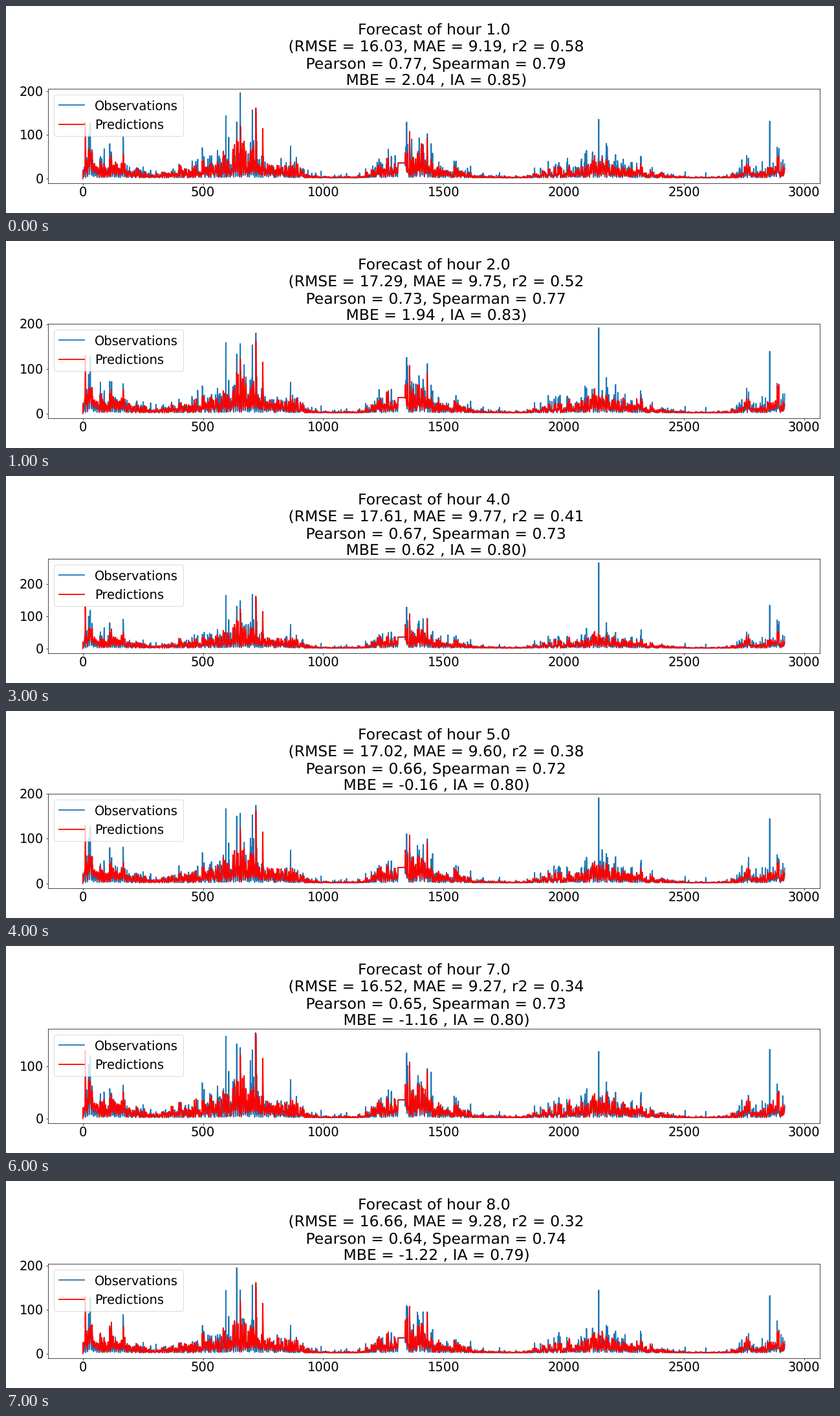
Write a matplotlib script that moves like this. It is 1280 px wide and 320 px high and loops after 8000 ms.

```python
import numpy as np
import matplotlib.pyplot as plt
from matplotlib.animation import FuncAnimation

plt.rcParams.update({"font.family": "DejaVu Sans", "font.size": 22,
                     "text.hinting": "none"})

W, H = 1280, 320
N = 2920
DAY = 8  # samples a day
HOURS = 8
GAP = slice(1311, 1341)  # constant stretch of missing data
GAP_LEVEL = 36

# RMSE, MAE, r2, Pearson, Spearman, MBE, IA
SCORES = [
    (16.03, 9.19, 0.58, 0.77, 0.79, 2.04, 0.85),
    (17.29, 9.75, 0.52, 0.73, 0.77, 1.94, 0.83),
    (18.19, 9.90, 0.45, 0.68, 0.75, 1.41, 0.80),
    (17.61, 9.77, 0.41, 0.67, 0.73, 0.62, 0.80),
    (17.02, 9.60, 0.38, 0.66, 0.72, -0.16, 0.80),
    (16.77, 9.43, 0.36, 0.65, 0.72, -0.66, 0.80),
    (16.52, 9.27, 0.34, 0.65, 0.73, -1.16, 0.80),
    (16.66, 9.28, 0.32, 0.64, 0.74, -1.22, 0.79),
]

# Polluted episodes: centre, width, height
EPISODES = [(35, 40, 85), (150, 35, 62), (250, 90, 12), (450, 60, 30),
            (660, 95, 98), (860, 50, 32), (1250, 45, 40), (1385, 60, 85),
            (1510, 90, 24), (1920, 40, 16), (2130, 100, 56), (2310, 60, 22),
            (2770, 35, 36), (2885, 28, 58)]

# Highest observation of each hour: sample, height
TOPS = [(655, 197), (2146, 192), (2146, 342), (2146, 266),
        (2146, 191), (718, 177), (718, 164), (640, 196)]

# Spikes that return every hour
OBS_SPIKES = {595: 155, 640: 138, 655: 150, 720: 165, 1347: 120,
              1433: 102, 2146: 140, 2857: 135}
PRED_SPIKES = {10: 130, 655: 122, 720: 162, 748: 115, 1359: 108, 1432: 92}

k = np.arange(N)
envelope = 5 + sum(h * np.exp(-((k - c) / w) ** 2 / 2) for c, w, h in EPISODES)


def per_day(values):
    return np.repeat(values, DAY)[:N]


# Weather shared by all hours: daily pulses, gusts and rare bursts
rng = np.random.default_rng(11)
DAYS = N // DAY + 1
strength = per_day(0.22 + 0.78 * rng.beta(1.1, 2.0, DAYS))
pulse = np.abs(np.cos(np.pi * (k + rng.normal(0, 0.7, N)) / DAY)) ** 1.3
pattern = strength * pulse * rng.uniform(0.7, 1.0, N)
low = per_day(rng.uniform(0.01, 0.14, DAYS))
gusts = rng.lognormal(0, 0.36, N)
bursts = (rng.random(N) < 0.025) * rng.exponential(4 + 0.3 * envelope)


def make_series(hour):
    noise = np.random.default_rng(100 + hour)
    peak_at, top = TOPS[hour - 1]
    gain = np.interp(hour, [1, HOURS], [1.1, 0.95])

    pred = 1 + envelope * (low + pattern * per_day(noise.normal(1, 0.12, DAYS)))
    pred = pred.clip(2, 130)
    for i, height in PRED_SPIKES.items():
        pred[i:i + 3] = height * np.array([1, 0.75, 0.5])

    obs = envelope * (0.02 + gain * pattern * gusts * noise.lognormal(0, 0.2, N))
    obs = (1 + np.minimum(obs, 1.4 * envelope) + bursts).clip(2, 0.8 * top)
    for i, height in OBS_SPIKES.items():
        obs[i] = min(height * noise.uniform(0.9, 1.1), 0.96 * top)
    obs[peak_at] = top

    obs[GAP] = pred[GAP] = GAP_LEVEL
    pred[0] = 0
    return obs, pred, top


def title_text(hour):
    rmse, mae, r2, pearson, spearman, mbe, ia = SCORES[hour - 1]
    return (f"Forecast of hour {hour:.1f}\n"
            f" (RMSE = {rmse:.2f}, MAE = {mae:.2f}, r2 = {r2:.2f}\n"
            f" Pearson = {pearson:.2f}, Spearman = {spearman:.2f}\n"
            f" MBE = {mbe:.2f} , IA = {ia:.2f})")


fig = plt.figure(figsize=(20, 5), dpi=64)
ax = fig.add_axes([64.5 / W, 46.5 / H, 1193.8 / W, 146 / H])
obs_line, = ax.plot(k, np.zeros(N), color="tab:blue", lw=2, label="Observations")
pred_line, = ax.plot(k, np.zeros(N), color="red", lw=2, label="Predictions")
ax.set_xlim(-0.05 * N, 1.05 * N)
ax.legend(loc="upper left")
title = ax.set_title("", linespacing=1.22)


def update(frame):
    hour = frame + 1
    obs, pred, top = make_series(hour)
    obs_line.set_ydata(obs)
    pred_line.set_ydata(pred)
    ax.set_ylim(-0.05 * top, 1.05 * top)
    title.set_text(title_text(hour))
    return obs_line, pred_line, title


anim = FuncAnimation(fig, update, frames=HOURS, interval=1000,
                     repeat=True, repeat_delay=0, blit=False)
plt.show()
```
